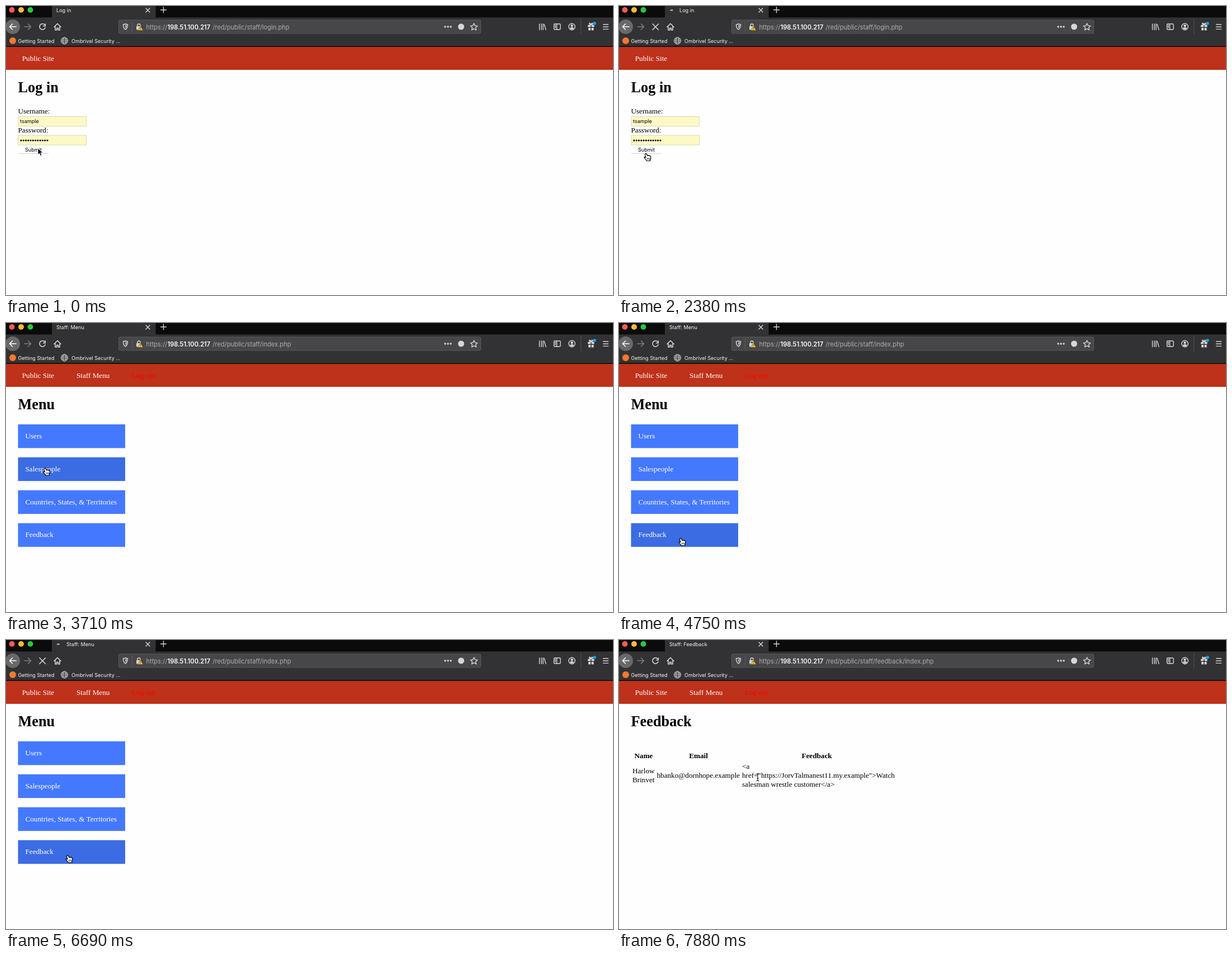
Recreate the animation shown at these times as an HTML page. Size 1085 px wide and 516 px high, loop 8 s.

```html
<!DOCTYPE html>
<html lang="en">
<head>
<meta charset="utf-8">
<title>Staff login</title>
<style>
html, body { margin: 0; width: 100%; height: 100%; overflow: hidden; background: #fefefe; }
svg { display: block; }
text { font: 13.16px "Liberation Serif", serif; white-space: pre; }
.ui { font: 9.1px Inter, sans-serif; fill: #f5f5f6; }
.url { font-size: 11.1px; fill: #aeaeb0; }
.ink { fill: #000; }
.nav, .link { fill: #fff; }
.h1 { font-size: 26.3px; font-weight: bold; }
.th { font-weight: bold; text-anchor: middle; }
.icon { fill: none; stroke: #d6d6d8; stroke-width: 1.4; stroke-linecap: round; stroke-linejoin: round; }
.field { fill: #fdf9c5; stroke: #dcd8ae; }
</style>
</head>
<body>
<svg width="1085" height="516" viewBox="0 0 1085 516">
  <defs>
    <linearGradient id="blue">
      <stop offset="0" stop-color="#22436b"/><stop offset="1" stop-color="#285080"/>
    </linearGradient>
  </defs>

  <!-- Browser chrome -->
  <rect width="1085" height="73" fill="#0b0b0c"/>
  <rect y="20.5" width="1085" height="51" fill="#323234"/>
  <rect x="82" width="185.5" height="21" fill="#323234"/>
  <rect id="burst" x="82" height="20.5" fill="url(#blue)"/>
  <circle cx="10.5" cy="7" r="5" fill="#fc5b57"/>
  <circle cx="27" cy="7" r="5" fill="#fdbc2e"/>
  <circle cx="43.5" cy="7" r="5" fill="#28c840"/>
  <ellipse id="throbber" cy="7.5" rx="2.8" ry="1.3" fill="#b5b5b7"/>
  <text id="title" class="ui" y="11"/>
  <path class="icon" stroke="#f0f0f1" d="M250 4l7 7m0-7l-7 7M276.5 7h10m-5-5v10"/>

  <circle cx="12" cy="37" r="13" fill="#69696b"/>
  <path class="icon" style="stroke:#fff;stroke-width:1.6" d="M18 37H6.5m5-5l-5 5 5 5"/>
  <path class="icon" style="stroke:#7d7d7f;stroke-width:1.6" d="M33 37h11.5m-5-5l5 5-5 5"/>
  <path id="reload" class="icon" style="stroke-width:1.6" d="M69.2 33.7a5.2 5.2 0 1 0 .9 4.9M70.3 32v3.7h-3.7"/>
  <path id="stop" class="icon" style="stroke-width:1.6" d="M60 32l10.5 10.5m0-10.5L60 42.500"/>
  <path class="icon" style="stroke-width:1.6" d="M86 37.500l6-6 6 6M88 37v6h2.700v-3.500h2.600V43H96v-6"/>
  <rect x="201.500" y="25" width="647" height="24" rx="2" fill="#474749" stroke="#59595b"/>
  <path class="icon" d="M213.500 32q-2 1-4 1 0 7 4 9 4-2 4-9-2 0-4-1z"/>
  <path d="M213.500 34v6q2.200-1.500 2.400-5.500z" fill="#d6d6d8"/>
  <path d="M225.500 28v18" stroke="#5b5b5d"/>
  <path class="icon" d="M235 36v-1.500a2.500 2.500 0 0 1 5 0V36"/>
  <rect x="233" y="36" width="8" height="6.500" rx="1" fill="#d6d6d8"/>
  <path d="M240 35.500l5 8h-10z" fill="#fdbf2c" stroke="#474749" stroke-width=".5"/>
  <path d="M240 38v2.700m0 1v1" stroke="#474749"/>
  <text class="ui url" x="250.500" y="41.500">https://</text>
  <text class="ui url" x="288.500" y="41.500" style="fill:#fafafa;font-weight:600">198.51.100.217</text>
  <text id="path" class="ui url" x="369.500" y="41.500"/>
  <g fill="#d6d6d8">
    <circle cx="785" cy="37" r="1.700"/><circle cx="790" cy="37" r="1.700"/><circle cx="795" cy="37" r="1.700"/>
    <circle cx="813.500" cy="37" r="5.500"/>
  </g>
  <path class="icon" d="M836.500 31l1.900 4.100 4.500.5-3.400 3 1 4.400-4-2.300-4 2.300 1-4.400-3.400-3 4.500-.5z"/>
  <path class="icon" d="M953.500 32v10.500m3.500-10.500v10.500m3-10.500v10.500m2-10l3 10"/>
  <rect class="icon" x="979.500" y="32" width="11.500" height="10" rx="1.500"/>
  <path class="icon" d="M984.500 32v10m-3-7.500h1m-1 2h1m-1 2h1" stroke-width="1"/>
  <circle class="icon" cx="1011.500" cy="37" r="5.700"/>
  <path d="M1011.500 33a2.200 2.200 0 0 1 0 4.600 2.200 2.200 0 0 1 0-4.600m-3.700 7q0-2 3.700-2t3.700 2q-3.700 3.500-7.400 0z" fill="#d6d6d8"/>
  <path d="M1027.500 23v28" stroke="#515153"/>
  <path d="M1040 34h5v3.500h-5zm6.500 0h5v3.500h-5zM1041 39h4v4.500h-4zm5.500 0h4v4.500h-4z" fill="#d6d6d8"/>
  <path class="icon" d="M1045.700 33.500q-4-.5-3-2.500t3 2.500q1-4 3-2.500t-3 2.500"/>
  <circle cx="1052" cy="31" r="2.800" fill="#0aa5f5"/>
  <path class="icon" d="M1067.500 33h9m-9 4.200h9m-9 4.200h9"/>

  <circle cx="12" cy="62" r="6" fill="#f7792b"/>
  <text class="ui" x="21.500" y="65.700">Getting Started</text>
  <g class="icon" style="stroke-width:1">
    <circle cx="104.500" cy="62" r="6"/><ellipse cx="104.500" cy="62" rx="2.800" ry="6"/>
    <path d="M98.500 62h12m-11-3h10m-10 6h10"/>
  </g>
  <text class="ui" x="117" y="65.700">Ombrivel Security ...</text>

  <!-- Page -->
  <rect y="73" width="1085" height="41" fill="#be311a"/>
  <text class="nav" x="28.800" y="98">Public Site</text>
  <g id="staffNav">
    <text class="nav" x="126" y="98">Staff Menu</text>
    <text x="225" y="98" fill="#f00">Log out</text>
  </g>
  <text id="heading" class="h1" x="21.500" y="154"/>

  <g id="login">
    <text x="21.500" y="192">Username:</text>
    <rect class="field" x="22" y="197.500" width="121.500" height="17"/>
    <text class="ui ink" x="25" y="209.300">tsample</text>
    <text x="21.500" y="226">Password:</text>
    <rect class="field" x="22" y="231" width="121.500" height="17"/>
    <path d="M27 240h47.500" stroke="#000" stroke-width="3.200" stroke-linecap="round" stroke-dasharray="0 4.270"/>
    <rect x="22" y="250" width="54" height="14" rx="3" fill="#d3d3d3"/>
    <rect x="22" y="249" width="54" height="14" rx="3" fill="#fff"/>
    <text class="ui ink" x="34" y="259.700">Submit</text>
  </g>

  <g id="menu"></g>

  <g id="feedback">
    <text class="th" x="44" y="211">Name</text>
    <text class="th" x="142" y="211">Email</text>
    <text class="th" x="353.500" y="211">Feedback</text>
    <text x="24" y="238">Harlow</text>
    <text x="24" y="253.700">Brinvet</text>
    <text x="67.500" y="246">hbanko@dornhope.example</text>
    <text x="220" y="230.300">&lt;a</text>
    <text x="220" y="246">href="https://JorvTalmanest11.my.example"&gt;Watch</text>
    <text x="220" y="261.700">salesman wrestle customer&lt;/a&gt;</text>
  </g>

  <!-- Pointers, each drawn around its own anchor -->
  <path id="arrow" d="M0 0v11.500l2.700-2.500 2 4.600 2.200-1-2-4.400h3.800z" fill="#000" stroke="#fff" stroke-width=".9"/>
  <g id="hand" stroke="#000" stroke-linejoin="round" stroke-linecap="round">
    <path d="M-3.500-6q1.500-1.500 2.600.6l1.100 2.700q1.200-1.200 2 0 1.200-1 2 .3 1.400-.6 1.800.9l.3 3.500-1 2.500v2h-6.500q-.7-2-3.600-4.900-1.500-1.800 0-2 1.200 0 2.300 1.100L-4-4.700z" fill="#fff" stroke-width="1.200"/>
    <path d="M0 1.500v2.500m2-2.500v2.500m2-2.500v2.500" stroke-width=".8"/>
  </g>
  <path id="beam" d="M-2.500-6.500q2 0 2.500 1 .5-1 2.500-1M0-5.500v11m-2.500 1q2 0 2.500-1 .5 1 2.500 1M-1.500 2h3" fill="none" stroke="#111" stroke-width="1.100"/>
</svg>
<script>
const DURATION = 8000;
const $ = id => document.getElementById(id);
const show = (id, on) => $(id).style.display = on ? '' : 'none';
const within = (t, from, to) => t >= from && t < to;

const buttons = ['Users', 'Salespeople', 'Countries, States, & Territories', 'Feedback'].map((label, i) => {
  const add = (tag, attrs) => {
    const el = document.createElementNS('http://www.w3.org/2000/svg', tag);
    for (const key in attrs) el.setAttribute(key, attrs[key]);
    return $('menu').appendChild(el);
  };
  const y = 181 + i * 58.8;
  const box = add('rect', { x: 21.5, y, width: 191.5, height: 42.3 });
  add('text', { x: 34.5, y: y + 25, class: 'link' }).textContent = label;
  return { box, y };
});

const pages = [
  { at: 0, id: 'login', title: 'Log in', heading: 'Log in', path: 'login.php' },
  { at: 2520, id: 'menu', title: 'Staff: Menu', heading: 'Menu', path: 'index.php' },
  { at: 6840, id: 'feedback', title: 'Staff: Feedback', heading: 'Feedback', path: 'feedback/index.php' },
];

// Pointer: start time, x, y, shape
const pointer = [
  [0, 57, 254, 'arrow'], [1200, 54, 258, 'arrow'], [1340, 50.5, 270, 'hand'],
  [3260, 53, 269, 'hand'], [3410, 60, 267, 'hand'], [3560, 68, 265, 'hand'],
  [3710, 72, 265.500, 'hand'], [3850, 79, 268, 'hand'], [4000, 80, 268.500, 'hand'],
  [4450, 84, 310, 'hand'], [4600, 104, 368, 'hand'], [4750, 112.5, 391, 'hand'],
  [6840, 110.5, 384, 'arrow'], [7590, 160, 330, 'arrow'], [7730, 228, 262, 'beam'],
  [7880, 248, 245, 'beam'],
];

// Tab flash after loading: start time, width, opacity
const flashes = [
  [0, 0, 0], [2520, 185.5, .3], [2670, 0, 0],
  [6840, 59, 1], [6990, 150, .65], [7140, 185.5, .2], [7290, 0, 0],
];

function draw(t) {
  const page = pages.findLast(p => t >= p.at);
  for (const p of pages) show(p.id, p === page);
  show('staffNav', page.id !== 'login');
  $('heading').textContent = page.heading;
  $('title').textContent = page.title;
  $('path').textContent = '/red/public/staff/' + page.path;

  const loading = within(t, 1640, 2520) || within(t, 6540, 6840);
  const settling = within(t, 2520, 3120) || within(t, 6840, 7440);
  $('title').setAttribute('x', loading ? 108 : 90);
  show('throbber', loading);
  $('throbber').setAttribute('cx', 94 + 3 * Math.sin(Math.floor((t - 2380) / 147) * 1.2));
  show('stop', loading || settling);
  show('reload', !loading && !settling);
  $('stop').style.stroke = settling ? '#7d7d7f' : '#d6d6d8';

  const [, width, opacity] = flashes.findLast(f => t >= f[0]);
  $('burst').setAttribute('width', width);
  $('burst').setAttribute('opacity', opacity);

  const [, x, y, shape] = pointer.findLast(p => t >= p[0]);
  for (const id of ['arrow', 'hand', 'beam']) show(id, id === shape);
  $(shape).setAttribute('transform', `translate(${x} ${y})`);

  const pressed = within(t, 6390, 6540);
  for (const b of buttons) {
    const hover = within(y, b.y, b.y + 42.3);
    b.box.setAttribute('fill', !hover ? '#4478ff' : pressed ? '#3061cb' : '#3b6ce3');
  }
}

function tick() {
  draw(performance.now() % DURATION);
  requestAnimationFrame(tick);
}
tick();
</script>
</body>
</html>
```
